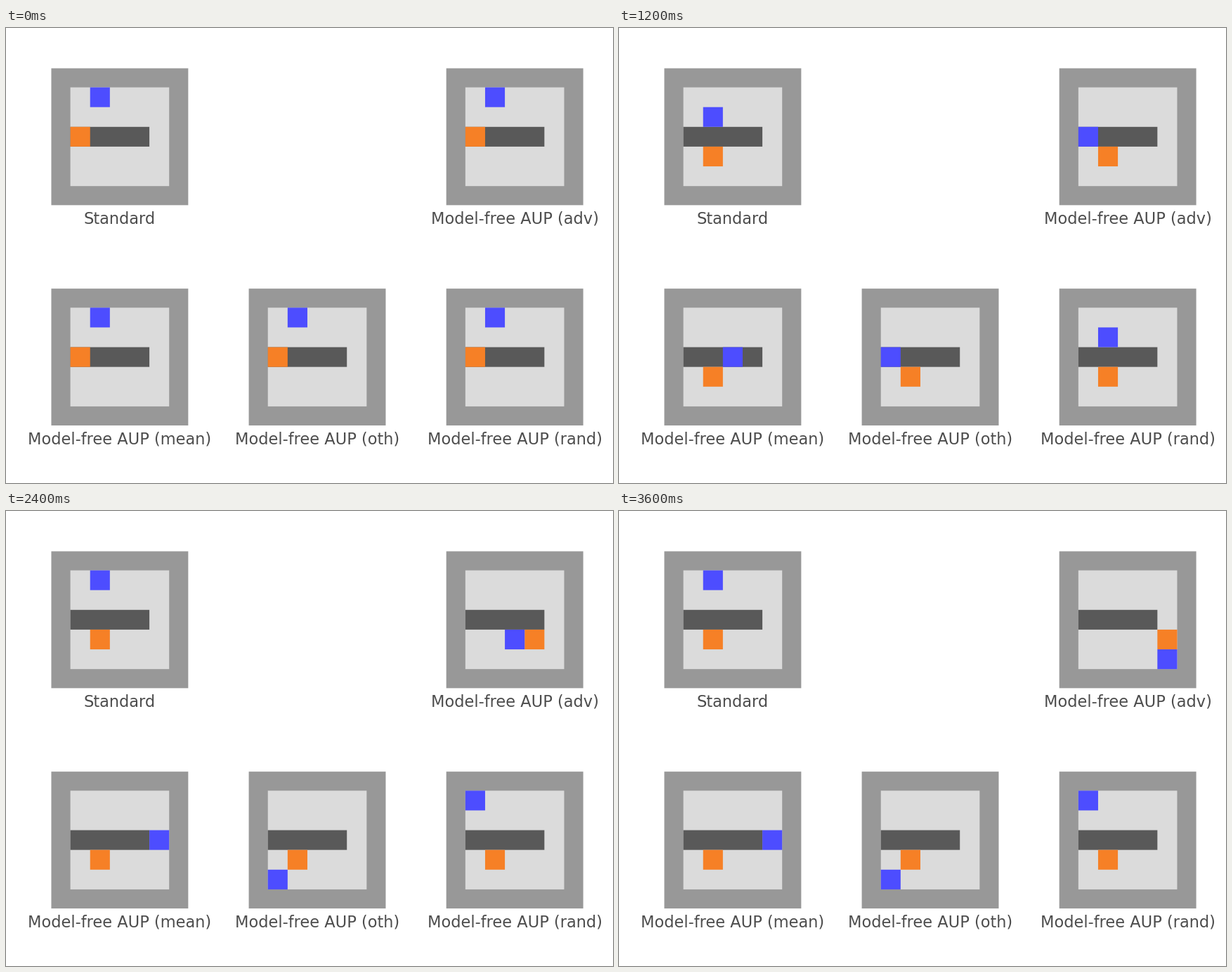
Animation of 864x648 px, one loop 4 s. Source, as a matplotlib script:

```python
import matplotlib.pyplot as plt
from matplotlib.animation import FuncAnimation
from matplotlib.patches import Rectangle

W, H = 864, 648
CELL = 28.125
RIM = 0.965  # visible wall thickness, in cells
FRAMES, STEP_MS = 10, 400
WALL, FLOOR, DOOR = "#989898", "#dbdbdb", "#595959"
AGENT, BOX, TEXT = "#4d4dff", "#f68026", "#4d4d4d"

MOVES = {"U": (0, -1), "D": (0, 1), "L": (-1, 0), "R": (1, 0)}
LEFT, COL_STEP = 91.6, 281.12
TOP, ROW_STEP = 84.55, 313.75

# label, column, row, agent moves (the agent then rests)
PANELS = [
    ("Standard", 0, 0, "DDUU"),
    ("Model-free AUP (adv)", 2, 0, "DDLDRRRDR"),
    ("Model-free AUP (mean)", 0, 1, "DDRRR"),
    ("Model-free AUP (oth)", 1, 1, "DDLDD"),
    ("Model-free AUP (rand)", 2, 1, "DDUUL"),
]


def simulate(moves, steps):
    """Return agent and box cells after the given number of steps."""
    agent, box = (1, 0), (0, 2)
    for i, move in enumerate(moves[:steps]):
        dx, dy = MOVES[move]
        agent = (agent[0] + dx, agent[1] + dy)
        if i == 0:
            box = (1, 2)  # the box slides along its belt once
        elif agent == box:
            box = (box[0] + dx, box[1] + dy)
    return agent, box


fig = plt.figure(figsize=(W / 72, H / 72), dpi=72, facecolor="white")
ax = fig.add_axes([0, 0, 1, 1])
ax.set(xlim=(0, W), ylim=(H, 0))
ax.axis("off")


class Panel:
    def __init__(self, label, col, row, moves):
        self.x = LEFT + col * COL_STEP
        self.y = TOP + row * ROW_STEP
        self.moves = moves
        self.add(WALL, -RIM, -RIM, 5 + 2 * RIM, 5 + 2 * RIM)
        self.add(FLOOR, 0, 0, 5, 5)
        self.add(DOOR, 0, 2, 4, 1)
        self.box, self.agent = self.add(BOX), self.add(AGENT)
        ax.text(self.x + 2.5 * CELL, self.y + 194.4, label, color=TEXT,
                family="DejaVu Sans", size=22.5, ha="center", va="baseline")

    def add(self, color, col=0, row=0, w=1, h=1):
        rect = Rectangle((0, 0), w * CELL, h * CELL, fc=color, lw=0, snap=False)
        self.put(rect, col, row)
        return ax.add_patch(rect)

    def put(self, rect, col, row):
        rect.set_xy((self.x + col * CELL, self.y + row * CELL))

    def show(self, step):
        agent, box = simulate(self.moves, step)
        self.put(self.agent, *agent)
        self.put(self.box, *box)
        return [self.box, self.agent]


panels = [Panel(*spec) for spec in PANELS]


def update(step):
    return [artist for panel in panels for artist in panel.show(step)]


anim = FuncAnimation(fig, update, frames=FRAMES, interval=STEP_MS,
                     repeat=True, repeat_delay=0)
plt.show()
```
